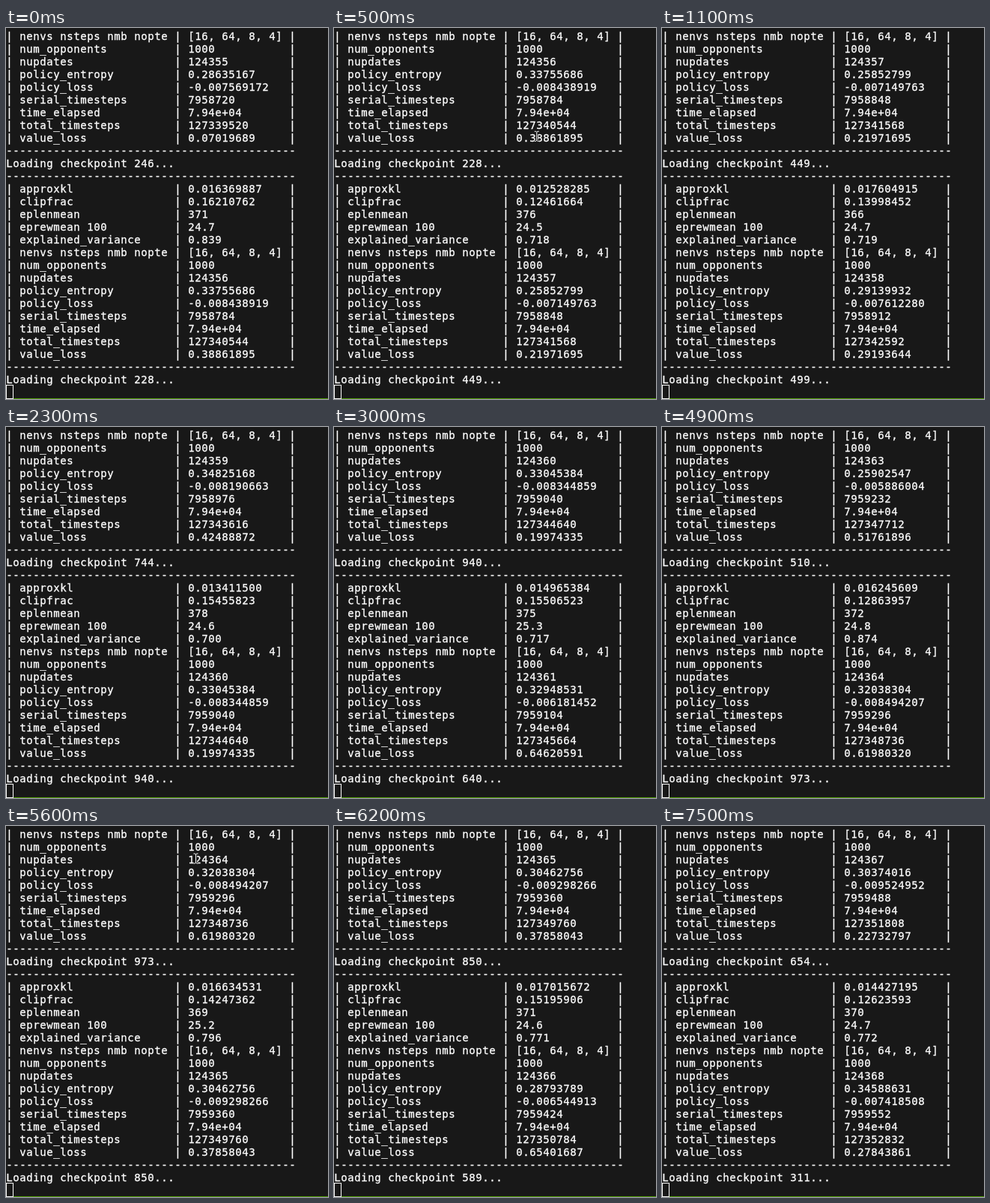
Recreate the animation shown at these times as an HTML page. Size 430 px wide and 496 px high, loop 8000 ms.

```html
<!DOCTYPE html>
<html lang="en">
<head>
<meta charset="utf-8">
<title>Training log</title>
<style>
  html, body { margin: 0; width: 100%; height: 100%; overflow: hidden; background: #181818; }
  svg { display: block; }
  text {
    font: 14px "DejaVu Sans Mono", monospace;
    letter-spacing: calc(9px - .60205em);
    fill: #fff; stroke: #fff; stroke-width: .3px;
    white-space: pre;
  }
</style>
</head>
<body>
<svg width="430" height="496" viewBox="0 0 430 496">
  <rect width="430" height="496" fill="#181818"/>
  <g id="rows"></g>
  <rect y="495" width="430" height="1" fill="#4e9a06"/>
  <rect x=".5" y="477.5" width="9" height="18" fill="none" stroke="#fff"/>
  <g id="pointer" fill="none">
    <path id="beam" d="M-3-6.5h2l1 1 1-1h2M0-5.5v11M-3 6.5h2l1-1 1 1h2" stroke="#181818" stroke-width="3"/>
    <path d="M-3-6.5h2l1 1 1-1h2M0-5.5v11M-3 6.5h2l1-1 1 1h2" stroke="#fff"/>
  </g>
</svg>
<script>
const LOOP = 8000, STEP = 100;
const ROW_HEIGHT = 17, VISIBLE_ROWS = 28;
const FIRST_UPDATE = 124355;
const FIRST_PRINT = 300, PRINT_INTERVAL = 654.5;
const RULE = '-'.repeat(43);

// Pointer visits as key points: time in ms, x, y.
const VISITS = [
  [[100, 4, 22], [300, 262, 122], [400, 262, 122], [800, 297, 213], [1000, 394, 250]],
  [[5500, 391, 60], [5600, 253.5, 43.5], [5900, 78, 34], [6100, 92, 7]]
];

function noise(seed) {
  const v = Math.sin(seed * 12.9898) * 43758.5453;
  return v - Math.floor(v);
}

function entry(key, value) {
  return `| ${key.padEnd(22)} | ${String(value).padEnd(14)} |`;
}

function block(index) {
  const update = FIRST_UPDATE + index;
  let seed = (index + 1) * 20;
  const random = (low, high, digits) => (low + (high - low) * noise(seed++)).toFixed(digits);
  return [
    RULE,
    entry('approxkl', random(.011, .02, 9)),
    entry('clipfrac', random(.121, .165, 8)),
    entry('eplenmean', random(365, 378, 0)),
    entry('eprewmean 100', random(24.5, 25.4, 1)),
    entry('explained_variance', random(.7, .9, 3)),
    entry('nenvs nsteps nmb nopte', '[16, 64, 8, 4]'),
    entry('num_opponents', 1000),
    entry('nupdates', update),
    entry('policy_entropy', random(.25, .36, 8)),
    entry('policy_loss', random(-.0096, -.0055, 9)),
    entry('serial_timesteps', update * 64),
    entry('time_elapsed', '7.94e+04'),
    entry('total_timesteps', update * 1024),
    entry('value_loss', random(.07, .69, 8)),
    RULE,
    `Loading checkpoint ${random(100, 999, 0)}...`
  ];
}

const rowsGroup = document.getElementById('rows');
const pointer = document.getElementById('pointer');
const rows = Array.from({ length: VISIBLE_ROWS }, (_, i) => {
  const row = document.createElementNS('http://www.w3.org/2000/svg', 'text');
  row.setAttribute('x', .3);
  row.setAttribute('y', 16 + i * ROW_HEIGHT);
  return rowsGroup.appendChild(row);
});
let shown = -1;

function showLog(top) {
  if (top === shown) return;
  shown = top;
  const lines = [...block(top), ...block(top + 1)].slice(-VISIBLE_ROWS);
  rows.forEach((row, i) => { row.textContent = lines[i]; });
}

function pointAt(path, t) {
  const next = path.findIndex(point => point[0] >= t);
  if (next < 0 || t < path[0][0]) return null;
  const b = path[next], a = path[Math.max(0, next - 1)];
  const k = a === b ? 0 : (t - a[0]) / (b[0] - a[0]);
  return [a[1] + (b[1] - a[1]) * k, a[2] + (b[2] - a[2]) * k];
}

function showPointer(t) {
  const spot = VISITS.map(path => pointAt(path, t)).find(Boolean);
  pointer.style.display = spot ? '' : 'none';
  if (spot) pointer.setAttribute('transform', `translate(${spot.join(' ')})`);
}

// Prints and pointer moves both land on whole steps.
function render(time) {
  const t = Math.floor(time / STEP) * STEP;
  const prints = Math.floor((t + STEP / 2 - FIRST_PRINT) / PRINT_INTERVAL) + 1;
  showLog(Math.max(0, prints));
  showPointer(t);
}

const startTime = performance.now();
function tick() {
  render((performance.now() - startTime) % LOOP);
  requestAnimationFrame(tick);
}
tick();
</script>
</body>
</html>
```
